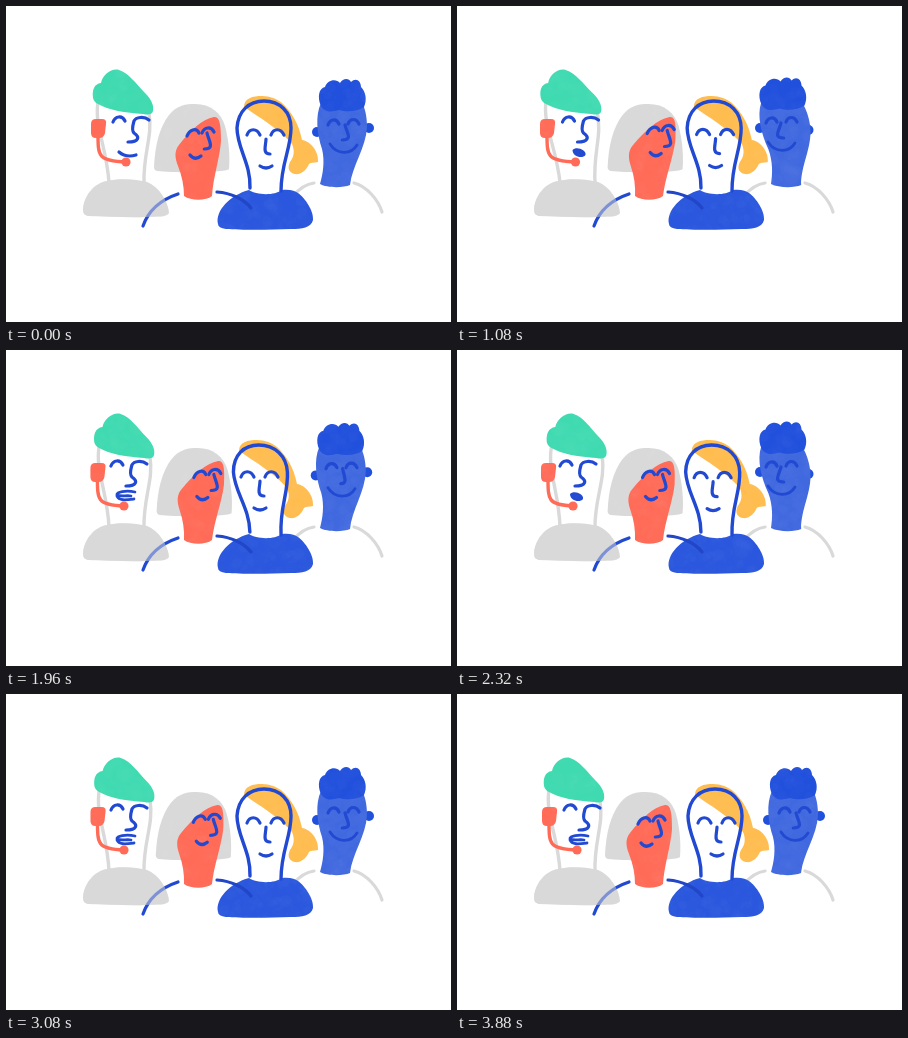
Recreate the animation shown at these times as an HTML page with a canvas. Size 445 by 316 pixels, loop 3920 ms.

```html
<!DOCTYPE html>
<html lang="en">
<head>
<meta charset="utf-8">
<title>Four friends</title>
<style>
  html, body { margin: 0; width: 100%; height: 100%; overflow: hidden; background: #fff; }
  canvas { display: block; width: 445px; height: 316px; }
</style>
</head>
<body>
<canvas id="stage"></canvas>
<script>
const W = 445, H = 316, LOOP = 3920, STEP = 40, BEAT = 120;
const BLUE = '#2a57de', HAIR = '#2150dd', INK = '#2149d2', SKIN = '#4169df',
      GREY = '#d9d9d9', RED = '#ff6b57', GREEN = '#40dab1', GOLD = '#ffbd50';

const canvas = document.getElementById('stage');
const dpr = window.devicePixelRatio || 1;
canvas.width = W * dpr;
canvas.height = H * dpr;
const ctx = canvas.getContext('2d');

// Soft paper mottling, laid over every filled shape
function makeGrain() {
  const c = document.createElement('canvas');
  c.width = W + 80;
  c.height = H + 80;
  const g = c.getContext('2d');
  let seed = 7;
  const rnd = () => (seed = seed * 16807 % 2147483647) / 2147483647;
  g.fillStyle = '#fff';
  g.globalAlpha = 0.012;
  for (let i = 0; i < 5000; i++) {
    g.beginPath();
    g.arc(rnd() * c.width, rnd() * c.height, 1 + rnd() * 6, 0, 7);
    g.fill();
  }
  return c;
}
const grain = makeGrain();
let grainX = 0, grainY = 0;

const ease = p => (p = Math.min(1, Math.max(0, p)), p * p * (3 - 2 * p));

// Eases to 1 after `from`, and back to 0 after `to`
const swing = (t, from, to, ramp = 320) => ease((t - from) / ramp) - ease((t - to) / ramp);

// Repeating mouth pattern, one letter per beat: s smile, l lips, o open
const mouthAt = (t, pattern) => pattern[Math.floor(t / BEAT) % pattern.length];

function fill(d, color) {
  const p = new Path2D(d);
  ctx.fillStyle = color;
  ctx.fill(p);
  ctx.save();
  ctx.clip(p);
  ctx.drawImage(grain, -grainX, -grainY);
  ctx.restore();
}

function line(d, color = INK, width = 3.2) {
  ctx.strokeStyle = color;
  ctx.lineWidth = width;
  ctx.stroke(new Path2D(d));
}

function dot(x, y, r, color) {
  ctx.fillStyle = color;
  ctx.beginPath();
  ctx.arc(x, y, r, 0, 7);
  ctx.fill();
}

function moved(x, y, draw) {
  ctx.save();
  ctx.translate(x, y);
  draw();
  ctx.restore();
}

// Lean sideways by dx at height top, pivoting on height base
function lean(dx, top, base, draw) {
  const k = dx / (base - top);
  ctx.save();
  ctx.transform(1, 0, -k, 1, k * base, 0);
  draw();
  ctx.restore();
}

const eye = (x, y, w, rise, tilt = 0) =>
  line(`M${x} ${y} C${x + w * .2} ${y - rise} ${x + w * .75} ${y - rise + tilt} ${x + w} ${y + tilt}`);

const nose = (x, y, h, n) =>
  line(`M${x} ${y} C${x + 2 * n} ${y + h * .5} ${x + 9 * n} ${y + h} ${x - 3 * n} ${y + h}`);

const greyBody = 'M77 203 C78 190 88 177 101 175 C113 172 130 173 141 176 C153 181 162 195 163 207 C160 212 150 210 140 211 C120 212 100 210 82 210 C78 209 77 207 77 203Z';

function drawMan(t) {
  const left = swing(t, 260, 1680), right = swing(t, 1760, 2880, 400);
  const face = -1.5 * left - 4 * right, set = -2 * left - right;
  lean(3 * right - 3.5 * left, 85, 176, () => {
    line('M92 96 C88 120 101 142 103 177', GREY, 3.4);
    line('M143 107 C147 130 137 147 138 177', GREY, 3.4);
    fill('M87 92 C86 84 88 78 95 77 C97 68 106 62 113 64 C123 67 129 77 139 87 C146 94 148 100 147 105 C146 109 142 109 137 108 C120 107 102 104 92 98 Q88 96 87 92Z', GREEN);
  });
  fill(greyBody, GREY);
  moved(face, 0, () => {
    eye(107, 116, 12, 6, -1);
    line('M143 114 C138 110 130 111 128 115 C127 119 125 124 128 127 C134 131 133 136 122 136');
    const mouth = mouthAt(t, 'ssllollsso');
    if (mouth === 's') line('M113 146 Q120 152 130 149');
    if (mouth === 'l') line('M131 142 C122 140 112 142 113 145 C117 147 123 145 127 146 M113 146 C115 151 122 150 130 149', INK, 2.8);
    if (mouth === 'o') fill('M117 144 C121 140 131 144 130 149 C127 153 117 151 117 144Z', INK);
  });
  line(`M${92 + set} 128 C${92 + set} 150 ${92 + set} 155 ${120 + face} 156`, RED, 3.4);
  dot(120 + face, 156, 4.6, RED);
  moved(set, 0, () => fill('M90 113 H96 Q101 113 100 118 L99 127 Q98 132 93 132 H90 Q85 132 85 127 V118 Q85 113 90 113Z', RED));
}

function drawBob(t) {
  const turn = swing(t, 280, 2960), back = swing(t, 1800, 2440);
  moved(2.6 * turn, 0, () =>
    fill('M148 161 C149 140 153 122 163 109 C171 99 180 98 189 98 C205 98 215 107 219 120 C223 135 224 150 223 163 C220 167 168 167 151 165 Q148 164 148 161Z', GREY));
  lean(4.5 * turn - back, 115, 190, () =>
    fill('M208 111 C196 113 184 125 173 139 C168 145 169 152 172 160 C176 170 178 180 178 190 C185 195 200 195 206 190 C207 172 214 151 215 135 C215 120 214 110 208 111Z', RED));
  moved(9.2 * turn - 4.7 * back, -2.5 * turn, () => {
    eye(181, 130, 12, 6, -3);
    eye(196, 127, 12, 6, -1);
    nose(201, 127, 16, .9);
    line('M184 149 Q189 155 195 150');
  });
  line('M137 220 C143 203 157 193 172 188');
  ctx.globalAlpha = .5;
  fill(greyBody, GREY);
  ctx.globalAlpha = 1;
}

function drawBoy(t) {
  const down = swing(t, 240, 760);
  const away = swing(t, 760, 1720) + swing(t, 2200, 2900, 120);
  moved(2 * down, 1.5 * down, () => line('M348 177 C360 180 372 193 376 206', GREY));
  line('M308 177 C300 178 293 183 287 190', GREY);
  dot(311 - 2 * down - 8 * away, 126 - 4 * away, 5, HAIR);
  dot(363 - 2 * down - 11.5 * away, 122 + 8 * down + 2 * away, 5, HAIR);
  const hairX = -down - 10.5 * away;
  moved(-2 * down, 2.5 * down, () => lean(hairX, 100, 178, () =>
    fill('M315 97 C309 110 311 128 316 143 C319 155 317 168 314 178 C321 182 337 182 344 179 C346 160 360 142 361 121 C361 110 359 102 356 97Z', SKIN)));
  moved(hairX, 7 * down - 1.5 * away, () =>
    fill('M315 100 C311 91 313 82 319 81 C321 74 330 72 334 77 C337 72 343 72 345 76 C350 71 355 75 355 81 C360 86 361 94 358 101 C351 106 340 106 333 104 C326 106 319 107 315 100Z', HAIR));
  moved(-6 * down - 13 * away, 8 * down - 2 * away, () => {
    const side = 1 - 2 * (down + away);
    eye(322, 119, 11, 6, -1);
    eye(342, 118, 11, 6);
    nose(338 + side, 119, 15, side * .9);
    line('M324 138 C331 149 345 149 351 139', INK, 2.8);
  });
}

function drawGirl(t) {
  const left = swing(t, 860, 2040, 700);
  fill('M212 218 C209 205 224 189 243 184 C250 189 268 190 276 184 C284 183 289 185 292 187 C299 192 308 205 307 214 C305 222 296 223 285 223 C262 224 235 224 220 223 Q212 222 212 218Z', BLUE);
  line('M211 186 C225 187 238 193 245 202', '#2146c8');
  moved(-5 * left, 0, () =>
    fill('M238 101 C238 92 247 90 256 90 C264 90 271 93 276 97 C285 105 293 118 296 134 C304 135 313 145 312 156 C309 157 305 156 303 158 C300 165 294 169 289 168 C283 167 281 162 284 156 C288 151 289 145 286 138 C272 122 254 112 238 101Z', GOLD));
  lean(-4.3 * left, 110, 184, () =>
    line('M244 182 C245 158 231 142 231 122 C232 105 243 95 258 95 C274 95 285 106 285 122 C285 143 275 157 275 185', INK, 3.4));
  moved(-6 * left, -2 * left, () => {
    const blink = Math.abs(t % 2160 - 700) < 140;
    eye(241, 129, 13, blink ? -4 : 7);
    eye(265, 129, 13, blink ? -4 : 7);
    line('M260 133 C260 139 256 148 264 148');
    const mouth = mouthAt(t, 'sssllsslos');
    if (mouth === 's') line('M254 160 Q260 164 266 160');
    if (mouth === 'l') line('M265 156 C256 155 252 159 260 160 C253 161 255 168 264 165', INK, 2.8);
    if (mouth === 'o') line('M255 160 A5 5 0 1 1 265 160 A5 5 0 1 1 255 160Z');
  });
}

function draw(t) {
  const beat = Math.floor(t / BEAT);
  grainX = beat * 37 % 80;
  grainY = beat * 53 % 80;
  ctx.setTransform(dpr, 0, 0, dpr, 0, 0);
  ctx.fillStyle = '#fff';
  ctx.fillRect(0, 0, W, H);
  ctx.lineCap = ctx.lineJoin = 'round';
  drawMan(t);
  drawBob(t);
  drawBoy(t);
  drawGirl(t);
}

const start = performance.now();
function tick() {
  const t = Math.max(0, performance.now() - start) % LOOP;
  draw(Math.floor(t / STEP) * STEP);
  requestAnimationFrame(tick);
}
tick();
</script>
</body>
</html>
```
